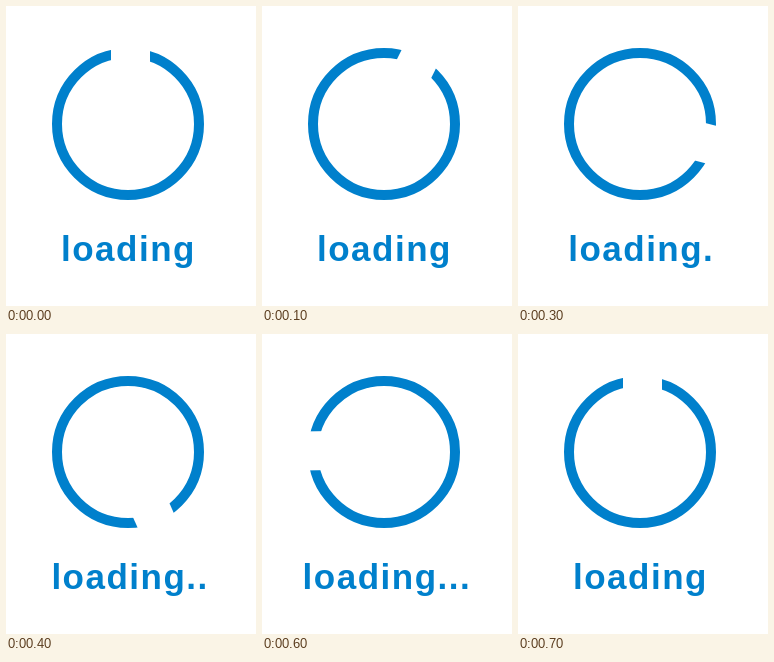
An HTML page for the animation above (800 ms loop, 250 px wide and 300 px high).

```html
<!DOCTYPE html>
<html lang="en">
<head>
<meta charset="utf-8">
<title>Loading</title>
<style>
  html, body { margin: 0; width: 100%; height: 100%; overflow: hidden; background: #fff; }
  svg { display: block; width: 250px; height: 300px; }
  text { font: bold 35px "Liberation Sans", Arial, sans-serif; letter-spacing: 1.5px; fill: #0080cc; }
</style>
</head>
<body>
<svg viewBox="0 0 250 300">
  <g transform="translate(122 118)">
    <circle r="71" fill="none" stroke="#0080cc" stroke-width="10"/>
    <rect id="gap" x="-17" y="-82" width="39" height="30" fill="#fff"/>
  </g>
  <text id="label" y="255"></text>
</svg>
<script>
  const LOOP = 800, STEP = 100;
  const turns = [0, 52.5, 156, 269]; // gap angle as each dot appears
  const gap = document.getElementById("gap");
  const label = document.getElementById("label");

  function draw(now) {
    // Seven poses; the first one also fills the last step of the loop
    const step = Math.floor(now % LOOP / STEP) % 7;
    const dots = Math.floor(step / 2);
    const from = turns[dots], to = turns[dots + 1];
    const angle = step % 2 ? (from + to) / 2 : from;

    gap.setAttribute("transform", `rotate(${angle})`);
    label.setAttribute("x", 55 - 4.8 * dots);
    label.textContent = "loading" + ".".repeat(dots);
    requestAnimationFrame(draw);
  }
  draw(performance.now());
</script>
</body>
</html>
```
